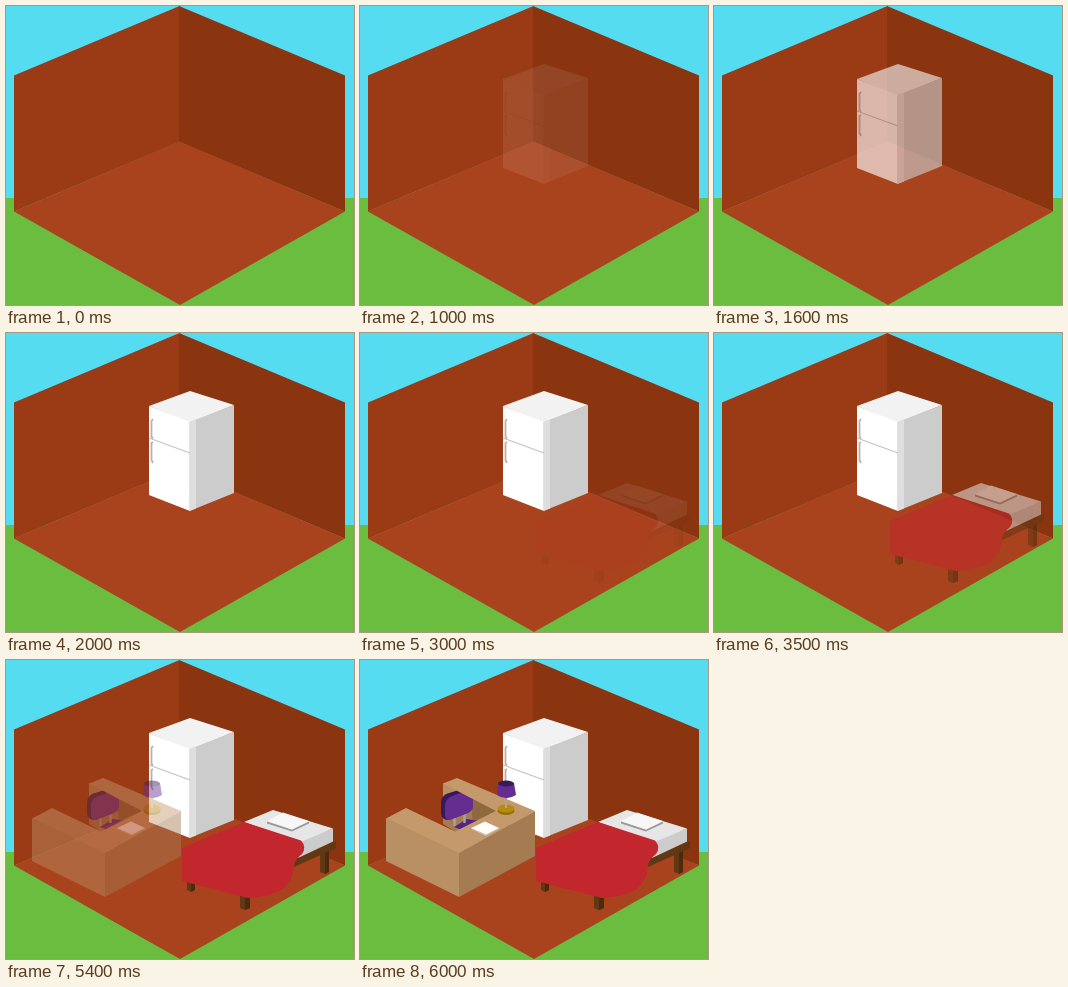
Write an HTML page that moves like this. It is 348 px wide and 299 px high and loops after 8000 ms.

```html
<!DOCTYPE html>
<html lang="en">
<head>
<meta charset="utf-8">
<title>Furnishing a room</title>
<style>
html, body { margin: 0; width: 100%; height: 100%; overflow: hidden; }
svg { display: block; width: 100vw; height: 100vh; }
</style>
</head>
<body>
<svg viewBox="0 0 348 299" preserveAspectRatio="none">
  <path fill="#55dcf0" d="M0 0H348V192H0z"/>
  <path fill="#6abd3e" d="M0 192H348V299H0z"/>
  <path fill="#9b3b16" d="M8 69.500L173.500 0V136L8 205.500z"/>
  <path fill="#8b3410" d="M173 0L339 69.500V205.500L173 136z"/>
  <path fill="#a9431d" d="M8 205.500L173.500 135.500L339 205.500L174 299z"/>

  <g class="item" opacity="0">
    <path fill="#f2f2f2" d="M143 73L184 58L228 72L184 90z"/>
    <path fill="#fff" d="M143 73L184 89V178L143 162z"/>
    <path fill="#ccc" d="M183.500 89L228 72V160L183.500 178z"/>
    <path fill="#dedede" d="M183.500 89L190 86.500V175.500L183.500 178z"/>
    <path stroke="#c4c4c4" stroke-width="1.300" d="M143 105L184 120"/>
    <path fill="none" stroke="#b3b3b3" stroke-width="1.800" d="M147 86L145.500 88V104L147 105.500M147 109L145.500 110V127L147 130"/>
  </g>

  <g class="item" opacity="0">
    <path fill="#603813" d="M181 220H189V230L185 232L181 230zM234 236H244V248L239 250L234 248zM314 190H323V212L319 214L314 212z"/>
    <path fill="#4b2a0e" d="M185 222L189 221V230L185 232zM239 238L244 236V248L239 250zM319 192L323 190V212L319 214z"/>
    <path fill="#603813" d="M286 200L330 181V188L288 207z"/>
    <path fill="#e6e6e6" d="M238 162L267 150L327 168.500L297 183z"/>
    <path fill="#ccc" d="M296 181.500L327 168.500V181.500L292 198z"/>
    <path fill="#999" d="M261 161.500L286 169.500L303 161.500V163.500L286 171.500L261 163.500z"/>
    <path fill="#f7f7f7" d="M261 161L277 152.500L303 161L286 169.500z"/>
    <path fill="#c1272d" d="M176 188L238 162L295 180.500Q301 187 296 194Q288 200 288 207Q287 219 278 228Q267 236 242 238L176 221z"/>
  </g>

  <g class="item" opacity="0">
    <path fill="#a57c52" d="M83 123L137 150V164L96 172L83 164z"/>
    <path fill="#8e683f" d="M110 137L137 150L113 163z"/>
    <path fill="#b89064" d="M83 123L97 130V140H83z"/>
    <path fill="#532485" d="M94 167L107 159L119 161L104 171z"/>
    <path stroke="#a3a3a3" stroke-width="2.500" d="M94.500 154V166M104.500 152V163"/>
    <path fill="#38195c" d="M81 143Q81 137 86 134L105 128Q111 128 112 133V147Q111 151 107 153L89 160Q82 160 81 154z"/>
    <path fill="#662d91" d="M85 146Q85 140 90 137L108 130Q113 130 113 135V147Q112 151 108 153L90 160Q85 160 85 155z"/>
    <path fill="#c49a6c" d="M26 158.500L46 148L95 171.500L136 151L83 123.500L97 118L175 151L99 194z"/>
    <path fill="#b89064" d="M26 158L99 193V237L26 201z"/>
    <path fill="#a57c52" d="M99 193L175 151V196L99 237z"/>
    <path fill="#c9c1b5" d="M111 168L126 174.500L139 168V169L126 176L111 169z"/>
    <path fill="#fffdf8" d="M111 168L125 161.500L139 168L126 174.500z"/>
    <ellipse cx="146" cy="151" rx="8.500" ry="4" fill="#94700c"/>
    <ellipse cx="146" cy="148.500" rx="8.500" ry="4" fill="#b58b14"/>
    <path stroke="#b3a58a" stroke-width="2" d="M146 135V148"/>
    <path fill="#662d91" d="M138 123L137 135Q146 141.500 156 135L154 123z"/>
    <ellipse cx="146" cy="123.500" rx="8" ry="3" fill="#38195c"/>
  </g>
</svg>
<script>
const LOOP = 8000, STEP = 100, STEPS = 11;
const starts = [1000, 3000, 5000];
const items = document.querySelectorAll('.item');

function draw() {
  const t = performance.now() % LOOP;
  items.forEach((item, i) => {
    const step = Math.floor((t - starts[i]) / STEP) + 1;
    item.setAttribute('opacity', Math.min(STEPS, Math.max(0, step)) / STEPS);
  });
  requestAnimationFrame(draw);
}
draw();
</script>
</body>
</html>
```
